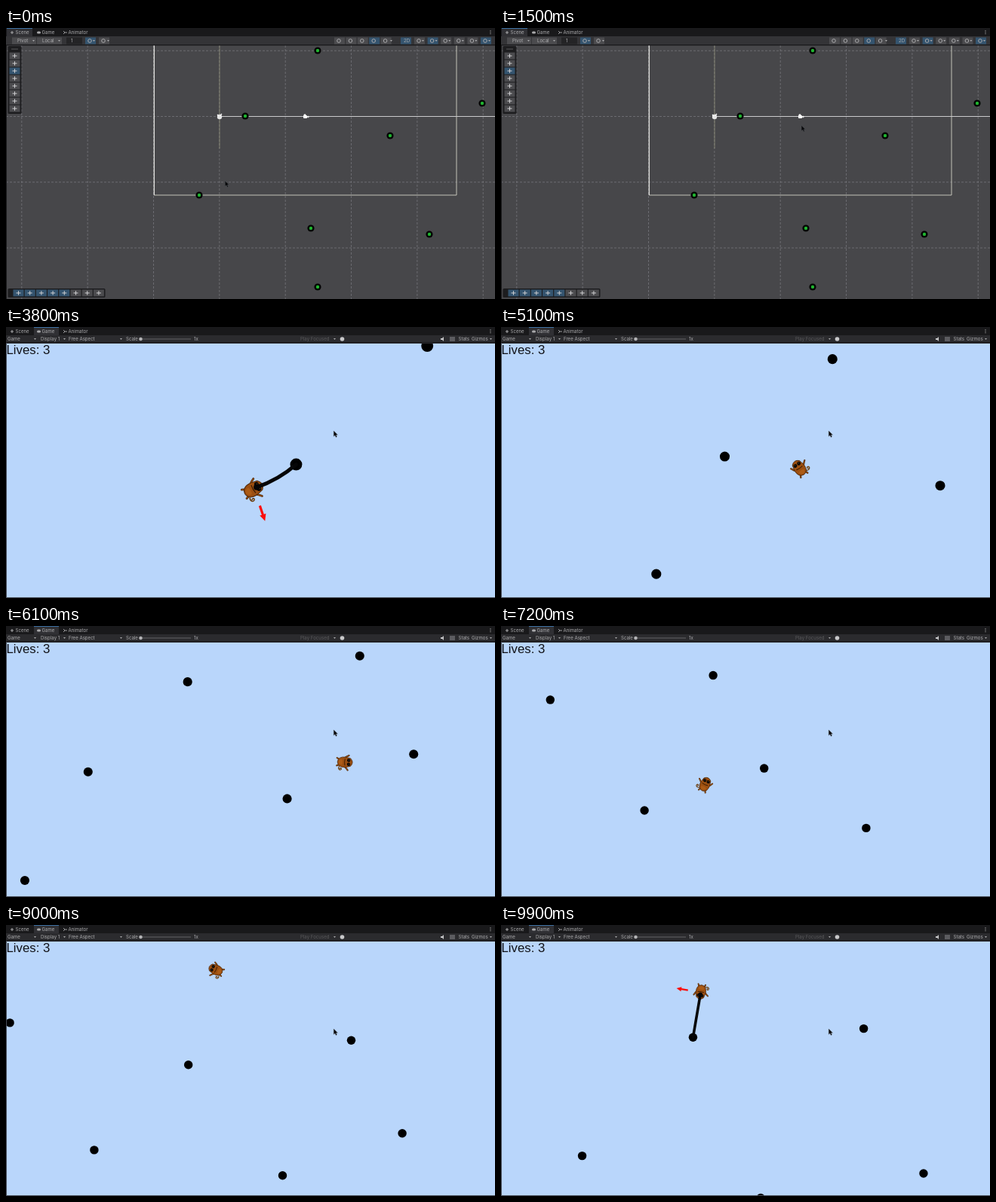
Write an HTML page that moves like this. It is 648 by 360 pixels and loops after 10 s.

```html
<!DOCTYPE html>
<html lang="en">
<head>
<meta charset="utf-8">
<title>Swinging monkey</title>
<style>
  html, body { margin: 0; width: 100%; height: 100%; overflow: hidden; background: #19191b; }
  svg { display: block; width: 100vw; height: 100vh; }
  text { font: 6.1px Inter, Roboto, sans-serif; fill: #aeaeb0; }
  .lives { font: 16.8px "Liberation Sans", Arial, sans-serif; fill: #121318; }
</style>
</head>
<body>
<svg id="stage" viewBox="0 0 648 360"></svg>
<script>
const LOOP = 10000, STEP = 100;
const GAME_AT = 1.7, PAUSE_FROM = 2.7, PAUSE = 1.1;
const FLIP_AT = 5.6;

// Anchor balls in scene view coordinates.
const balls = [
  [317, 117], [413, 30], [509, 143], [256, 222], [404, 266], [561, 274], [413, 344],
  [631, 100], [579, 5], [735, 161], [344, -134], [518, -143], [231, -13]
];

// Every swing turns anticlockwise; angles run on from one swing to the next.
const swings = [
  { ball: balls[0], from: 2.7, to: 3.6, r: 36.7, a0: 150, a1: 25, sag: 6 },
  { ball: balls[7], from: 5.1, to: 5.85, r: 55, a0: 175, a1: -150, sag: 0 },
  { ball: balls[2], from: 6.4, to: 6.8, r: 50, a0: -265, a1: -370, sag: 0 },
  { ball: balls[10], from: 8.3, to: 8.8, r: 47.7, a0: -340, a1: -440.3, sag: 0 }
];

const rad = deg => deg * Math.PI / 180;

// Position and rotation on a swing, head towards the ball.
function onSwing(s, p) {
  const a = s.a0 + (s.a1 - s.a0) * (p - s.from) / (s.to - s.from);
  return [s.ball[0] + s.r * Math.cos(rad(a)), s.ball[1] + s.r * Math.sin(rad(a)), a - 90];
}

// Flights pass through these points: time, x, y, rotation.
const flight = [
  [1.7, 283, 120, 0], [2.2, 282.6, 129, 0], [4, 383.9, 127.8, -35],
  [6.1, 570.5, 116.9, -335], [7.1, 550.5, 44.6, -450],
  ...swings.flatMap(s => [s.from, s.to].map(p => [p, ...onSwing(s, p)]))
].sort((a, b) => a[0] - b[0]);

// Time, x, y, zoom.
const camera = [
  [2.2, 283.1, 119.7, 1.83], [2.7, 283.6, 121.1, 1.81], [4, 335.5, 129.1, 1.487],
  [6.1, 612, 100.7, 1.3], [7.1, 543.6, 128.4, 1.3], [8.8, 397.5, -102.7, 1.3]
];

// Time, x, y.
const cursor = [
  [0, 290.3, 203], [.6, 335, -12], [.9, 335, -12], [1.3, 397, 129],
  [2.2, 402, 130.8], [2.7, 434.3, 138]
];

const find = (keys, t) => {
  let i = 0;
  while (i < keys.length - 2 && t >= keys[i + 1][0]) i++;
  const a = keys[i], b = keys[i + 1];
  return [i, a, b, Math.min(1, Math.max(0, (t - a[0]) / (b[0] - a[0])))];
};

const linear = (keys, t) => {
  const [, a, b, u] = find(keys, t);
  return a.slice(1).map((v, k) => v + (b[k + 1] - v) * u);
};

// Catmull-Rom through unevenly timed keys.
const smooth = (keys, t) => {
  const [i, a, b, u] = find(keys, t), span = b[0] - a[0];
  const p = keys[i - 1] || a, n = keys[i + 2] || b;
  return a.slice(1).map((v, j) => {
    const k = j + 1;
    const m0 = (b[k] - p[k]) / (b[0] - p[0]) * span;
    const m1 = (n[k] - v) / (n[0] - a[0]) * span;
    const d = b[k] - v;
    return v + u * (m0 + u * (3 * d - 2 * m0 - m1 + u * (m0 + m1 - 2 * d)));
  });
};

const rect = (x, y, w, h, fill, extra = '') =>
  `<rect x="${x}" y="${y}" width="${w}" height="${h}" fill="${fill}" ${extra}/>`;
const dot = (x, y, r, fill, extra = '') =>
  `<circle cx="${x}" cy="${y}" r="${r}" fill="${fill}" ${extra}/>`;
const line = (d, stroke, w = 1, extra = '') =>
  `<path d="${d}" fill="none" stroke="${stroke}" stroke-width="${w}" ${extra}/>`;
const label = (x, y, s, extra = '') => `<text x="${x}" y="${y}" ${extra}>${s}</text>`;
const range = (n, f) => Array.from({ length: n }, (_, i) => f(i)).join('');

const ICON = '#a9a9ab', BLUE = '#34546f', DARK = '#19191b', BUTTON = '#4b4b4e';
const caret = (x, y = 16) => `<path d="M${x} ${y}h3l-1.5 2z" fill="${ICON}"/>`;

function tabs(active, bar) {
  const [x, w] = active ? [37, 33] : [1, 34];
  return rect(0, 0, 648, 11, DARK) + rect(0, 11, 648, 11, bar) +
    rect(x, 0, w, 11, '#303034') + rect(x, 0, w, 1, '#3a6ea0') +
    line('M6 6h4M8 4v4', ICON) + label(12.5, 8.4, 'Scene') +
    rect(41, 4.5, 5, 3, ICON, 'rx="1.5"') + label(47.5, 8.4, 'Game') +
    line('M76 4l2 2-2 2M78 6h3', ICON, .9) + label(82.5, 8.4, 'Animator') +
    range(3, i => dot(642, 3.7 + i * 2, .6, ICON));
}

function sceneView() {
  const grid = range(8, i => `M${20.8 + i * 87.35} 23V360`) +
    range(4, i => `M0 ${30.2 + i * 87.3}H648`);
  const tool = (x, y, on) => rect(x, y, 14, 9, on ? BLUE : BUTTON) +
    line(`M${x + 4} ${y + 4.5}h6M${x + 7} ${y + 1.8}v5.4`, '#cfcfd1', 1);
  const icon = (x, on) => rect(x - 6, 12.5, 14, 9, on ? BLUE : BUTTON) +
    dot(x, 17, 2.3, 'none', `stroke="${ICON}"`);
  return rect(0, 0, 648, 360, '#47474a') +
    line(grid, '#75757a', .8, 'stroke-dasharray="3 2"') +
    line('M283 23V160', '#8d8d78', .8) +
    line('M196.3 222H597V23', '#c3c3b8', 1) +
    line('M196.3 23V222', '#f0f0ec', 1.2) +
    line('M283 117.5H648', '#cbcbcd', 1) +
    balls.slice(0, 8).map(([x, y]) =>
      dot(x, y, 4.6, '#030503') + dot(x, y, 2.2, '#1fb52f')).join('') +
    dot(283, 118, 3.2, '#e6e6e6') + line('M280 115l2 2M286 114l-2 2', '#fff', 1.2) +
    rect(394, 116, 5, 4, '#fff', 'rx="1"') + dot(396, 115.8, 1.6, '#fff') +
    line('M399 118l2-1v2z', '#fff', .8) +
    tabs(0, '#343437') + rect(0, 22, 648, 1.3, DARK) +
    rect(8, 12.5, 32, 9, BUTTON) + label(15, 19.2, 'Pivot') + caret(35) +
    rect(41, 12.5, 33, 9, BUTTON) + label(48, 19.2, 'Local') + caret(69) +
    rect(80, 12.5, 21, 9, '#242426') + label(86, 19.2, '1') +
    icon(111, true) + caret(115) + icon(129) + caret(134) +
    range(5, i => icon(441 + i * 15.4, i === 3)) + caret(509) +
    rect(523, 12.5, 14, 9, BLUE) + label(527, 19.2, '2D') +
    range(6, i => icon(547 + i * 17.6, i === 1 || i === 5) + caret(551 + i * 17.6)) +
    rect(2.5, 24, 18, 90, '#1d1d1f', 'rx="1.5"') + line('M7 28h9', '#58585b', 1) +
    range(8, i => tool(4.5, 32.5 + i * 10, i === 2)) +
    rect(2.5, 346, 129, 12, '#1d1d1f', 'rx="1.5"') +
    range(8, i => tool(9.5 + i * 15.2, 347.5, i < 5)) +
    rect(0, 23, 1, 337, DARK);
}

function gameFrame() {
  return tabs(1, '#2b2b2e') + rect(0, 20, 648, 1, DARK) +
    label(2, 18.2, 'Game') + caret(37, 15) + label(46, 18.2, 'Display 1') + caret(76, 15) +
    label(83, 18.2, 'Free Aspect') + caret(151, 15) + label(159, 18.2, 'Scale') +
    line('M178 16H245', '#69696c', .9) + dot(178.5, 16, 2.3, '#b4b4b6') +
    label(249, 18.2, '1x') + label(390, 18.2, 'Play Focused', 'opacity=".35"') +
    caret(434, 15) + dot(445.5, 16, 2.8, '#c8c8ca') +
    `<path d="M576 15h2l2-2v6l-2-2h-2z" fill="#c8c8ca"/>` +
    rect(588, 13, 7, 6, '#5c5c60') + label(599.5, 18.2, 'Stats') +
    label(617, 18.2, 'Gizmos') + caret(641, 15) +
    rect(0, 21, 1, 339, '#454a55') + rect(0, 359, 648, 1, '#454a55') +
    label(.5, 36.4, 'Lives: 3', 'class="lives"');
}

function monkeyArt() {
  const round = 'stroke-linecap="round" stroke-linejoin="round"';
  const limbs = 'M-7 0L-10 -4L-12 -8M7 0L11 -4L14 -6.5M-5 9L-7 13M5 9L6.5 13';
  return line(limbs, '#4b260a', 2.8, round) + line(limbs, '#96500f', 1.4, round) +
    line('M8 9C12 11 15 8 13.5 5.5C12 3.5 9.5 5.5 11.5 7.5', '#6a3d0c', 1.6, round) +
    '<path d="M-7 -11Q0 -18 7 -11L9 -2Q10 11 0 12Q-10 11 -9 -2Z" fill="#9c4f10" stroke="#4b260a"/>' +
    '<path d="M-5 4Q0 2 5 4Q5 10 0 10Q-5 10 -5 4Z" fill="#ac5c17"/>' +
    line('M-6 -1.2Q0 .2 6 -1.2', '#351a05', 1.2) +
    [-3.5, 3.5].map(x => dot(x, -7.8, 3, '#0e0a06') + dot(x, -8.6, .6, '#8d6a3a')).join('');
}

const stage = document.getElementById('stage');
stage.innerHTML =
  `<g id="scene">${sceneView()}</g>
  <g id="game">${rect(0, 0, 648, 360, '#b9d6fb')}
    <g id="balls">${balls.map(() => dot(0, 0, 1, '#000')).join('')}</g>
    <g id="monkey">${monkeyArt()}</g>
    <g id="swing">
      <path id="rope" fill="none" stroke="#060607" stroke-linecap="round"/>
      <circle id="hand" fill="#060607"/>
      <path id="arrow" d="M0 -1.6H12.5V-4.3L21.5 0L12.5 4.3V1.6H0Z" fill="#fb0d0a"/>
    </g>${gameFrame()}</g>
  <path id="pointer" d="M0 0V7.3L1.7 5.8L2.9 8.4L4.2 7.8L3 5.3H5.2Z" fill="#08080a" stroke="#55585e" stroke-width=".4"/>`;

const el = {};
stage.querySelectorAll('[id]').forEach(n => el[n.id] = n);
const set = (n, attrs) => { for (const k in attrs) n.setAttribute(k, attrs[k]); };
const show = (n, on) => n.style.display = on ? '' : 'none';

function drawSwing(s, p, mx, my, zoom, [bx, by]) {
  const k = zoom / 1.82, dist = Math.hypot(bx - mx, by - my);
  const ux = (bx - mx) / dist, uy = (by - my) / dist;
  const hx = mx + ux * 6 * k, hy = my + uy * 6 * k;
  const sag = s.sag * k * Math.max(0, 1 - (p - s.from) / .4);
  const cx = (hx + bx) / 2 - uy * sag, cy = (hy + by) / 2 + ux * sag;
  set(el.rope, { d: `M${hx} ${hy}Q${cx} ${cy} ${bx} ${by}`, 'stroke-width': 5 * k });
  set(el.hand, { cx: hx, cy: hy, r: 4 * k });

  // The arrow is square to the rope's lower end.
  const deg = Math.atan2(cx - hx, hy - cy) * 180 / Math.PI;
  const ax = mx + ux * 2 * k, ay = my + uy * 2 * k;
  set(el.arrow, { transform: `translate(${ax} ${ay}) rotate(${deg}) scale(${k}) translate(24 0)` });
}

function draw(ms) {
  const t = Math.floor(ms % LOOP / STEP) * STEP / 1000;
  const inGame = t >= GAME_AT;
  show(el.scene, !inGame);
  show(el.game, inGame);
  set(el.pointer, { transform: `translate(${linear(cursor, t)})` });
  if (!inGame) return;

  const p = t < PAUSE_FROM ? t : Math.max(PAUSE_FROM, t - PAUSE);
  const [camX, camY, zoom] = smooth(camera, p);
  const toScreen = ([x, y]) => [324 + (x - camX) * zoom, 190 + (y - camY) * zoom];
  balls.forEach((ball, i) => {
    const [cx, cy] = toScreen(ball);
    set(el.balls.children[i], { cx, cy, r: 4.4 * zoom });
  });

  const swing = swings.find(s => p >= s.from && p < s.to + .01);
  const pose = swing ? onSwing(swing, p) : smooth(flight, p);
  const [mx, my] = toScreen(pose), k = zoom / 1.83;
  const flip = p > FLIP_AT ? -k : k;
  set(el.monkey, { transform: `translate(${mx} ${my}) rotate(${pose[2]}) scale(${flip} ${k})` });
  show(el.swing, swing);
  if (swing) drawSwing(swing, p, mx, my, zoom, toScreen(swing.ball));
}

const start = performance.now();
function tick() {
  draw(performance.now() - start);
  requestAnimationFrame(tick);
}
tick();
</script>
</body>
</html>
```
